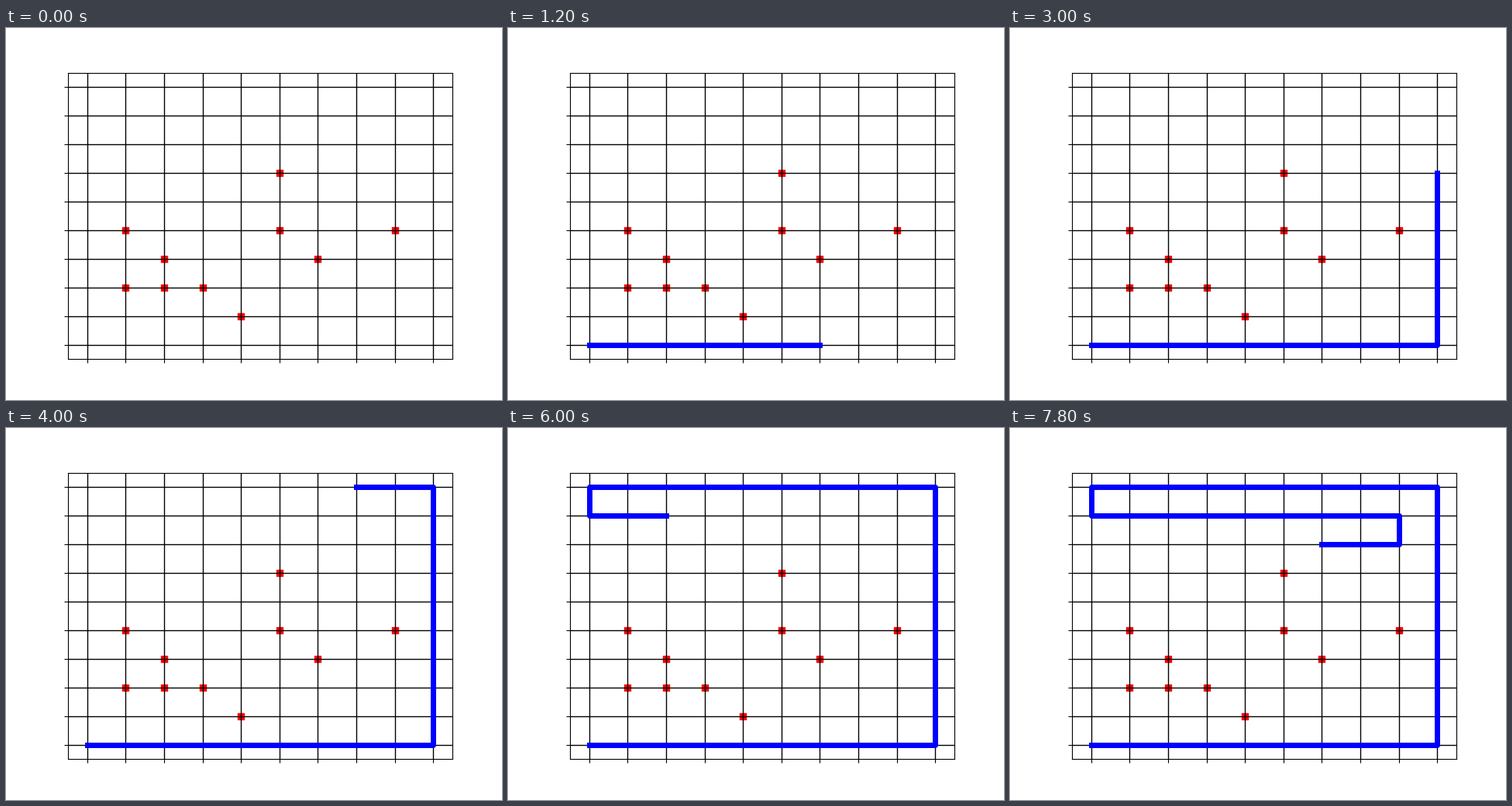
Write a matplotlib script that moves like this. It is 640 by 480 pixels and loops after 8 s.

```python
import matplotlib.pyplot as plt
from matplotlib.animation import FuncAnimation

SIZE = 10
STEPS = 40
INTERVAL = 200
BLOCKS = [(1, 2), (1, 4), (2, 2), (2, 3), (3, 2),
          (4, 1), (5, 4), (5, 6), (6, 3), (8, 4)]


def sweep(size):
    """Cells along the bottom, up the right side, then zigzag down the rows."""
    last = size - 1
    yield from ((x, 0) for x in range(size))
    yield from ((last, y) for y in range(1, size))
    for y in range(last, 0, -1):
        row = range(last)
        if (last - y) % 2 == 0:
            row = reversed(row)
        yield from ((x, y) for x in row)


path = list(sweep(SIZE))

fig, ax = plt.subplots(figsize=(6.4, 4.8), dpi=100)
ax.set(xlim=(-0.5, SIZE - 0.5), ylim=(-0.5, SIZE - 0.5),
       xticks=range(SIZE), yticks=range(SIZE))
ax.tick_params(labelbottom=False, labelleft=False)
ax.grid(color="black", linewidth=1)

# the obstacles lie under the grid lines, the trail above them
ax.scatter(*zip(*BLOCKS), s=36, marker="s", color="red", zorder=1)
trail, = ax.plot([], [], color="blue", linewidth=5, zorder=2)


def draw(step):
    trail.set_data(*zip(*path[:step + 1]))
    return trail,


anim = FuncAnimation(fig, draw, frames=STEPS, interval=INTERVAL,
                     repeat=True, repeat_delay=0)
plt.show()
```
